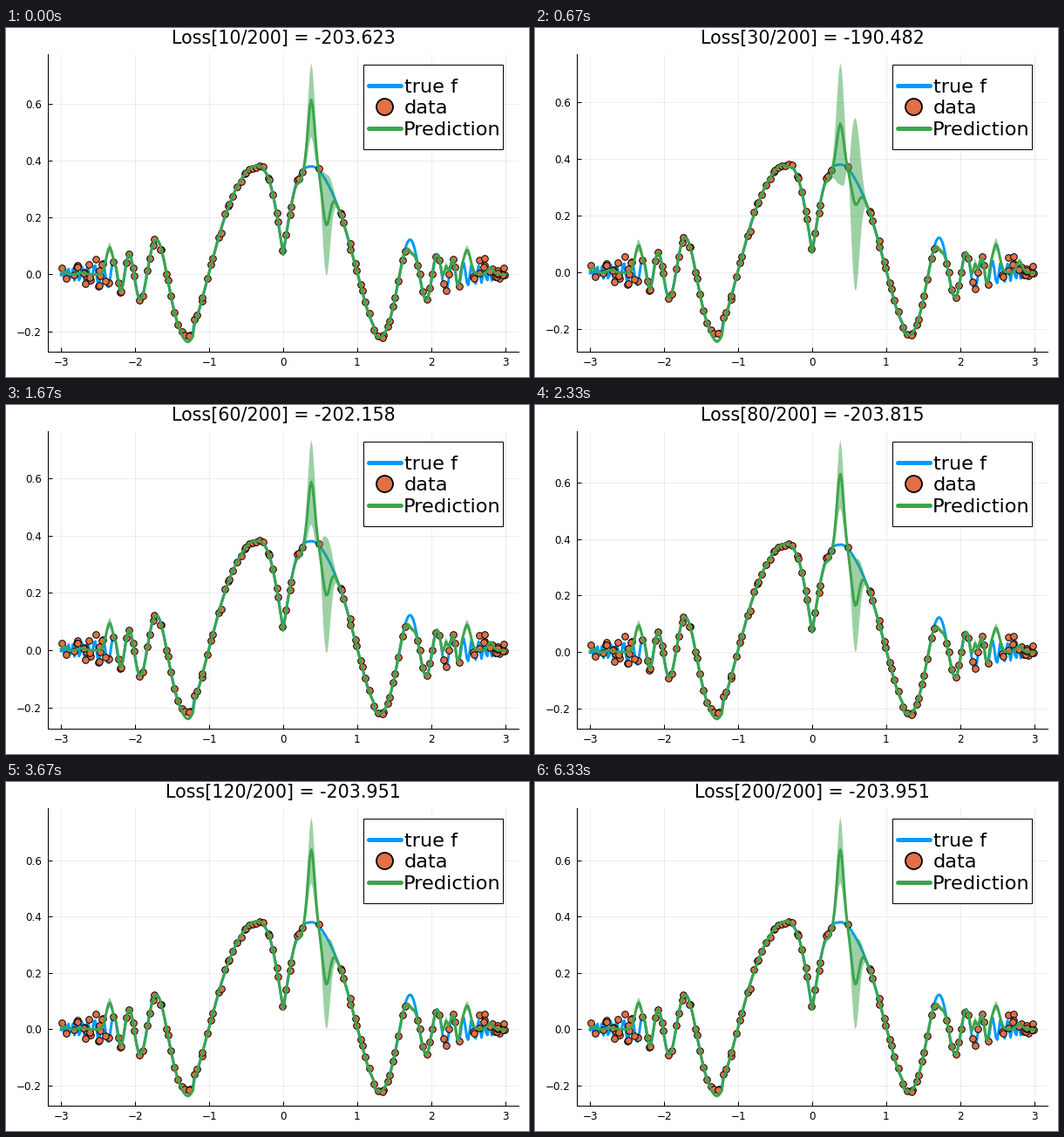
A matplotlib script for the animation above (6.66 s loop, 600 by 400 pixels).

```python
import numpy as np
import matplotlib.pyplot as plt
from matplotlib.animation import FuncAnimation
from matplotlib.patches import Rectangle

W, H, DPI = 600, 400, 100
PT = 72 / DPI  # points per pixel
LOOP, STEPS, TICK = 6660, 20, 45
BLUE, ORANGE, GREEN = "#009AFA", "#E26F46", "#3DA44D"
plt.rcParams["font.family"] = "DejaVu Sans"


def smooth(x, px, py):
    """Cubic Hermite curve through a few points."""
    px, py = np.array(px), np.array(py)
    m = np.gradient(py, px)
    k = np.clip(np.searchsorted(px, x) - 1, 0, len(px) - 2)
    h = px[k + 1] - px[k]
    t = (x - px[k]) / h
    return ((1 + 2 * t) * (1 - t) ** 2 * py[k] + t * (1 - t) ** 2 * h * m[k]
            + t * t * (3 - 2 * t) * py[k + 1] + t * t * (t - 1) * h * m[k + 1])


def bump(x, centre, width):
    return np.exp(-((x - centre) / width) ** 2)


def true_f(x):
    """Even function: a cusped hill in the middle, a decaying chirp outside."""
    a = np.abs(x)
    hill = smooth(np.minimum(a, 1.3),
                  [0, .05, .165, .38, .6, .8, 1, 1.15, 1.3],
                  [.07, .155, .31, .38, .32, .193, .008, -.135, -.222])
    phase = np.pi * (np.exp(2 * a) - 15) / 16.5
    return np.where(a < 1.22, hill, -1.62 * np.exp(-1.5 * a) * np.cos(phase))


# where the fit strays from the truth: centre, width, settled and rough height
BUMPS = [(-2.96, .04, .01, .04), (-2.72, .06, .006, .018),
         (-2.345, .065, .095, .1), (-1.27, .09, -.017, -.038),
         (-.33, .05, .006, -.035), (.235, .05, -.03, -.02),
         (1.73, .06, -.045, -.04), (2.2, .035, .09, .09),
         (2.485, .065, .085, .135), (2.8, .05, .022, .085)]


def predict(x, settle, rough):
    """Mean and half band; settle and rough run from 0 to 1."""
    # beyond the edge the fit no longer follows the chirp
    edge = np.where(x < 0, 2.25, 2.4)
    y = true_f(x) / (1 + np.exp((np.abs(x) - edge) / .015))
    half = np.full_like(x, .002)
    wild = max(rough, .2 * (1 - settle))
    for centre, width, calm, loose in BUMPS:
        part = (calm + wild * (loose - calm)) * bump(x, centre, width)
        y += part
        half += .17 * (1 + .6 * rough) * np.abs(part)

    # the gap without samples: one overshoot, one dip, pinned between
    y += (.155 + .102 * settle - .038 * rough) * bump(x, .38, .062)
    y -= (.105 + .064 * settle - .055 * rough) * bump(x, .58, .07)
    gap = (.175 - .06 * settle + .125 * rough) * bump(x, .382, .075)
    gap += (.245 - .087 * settle + .195 * rough) * bump(x, .585, .08)
    return y, half + gap * (1 - bump(x, .483, .03))


rng = np.random.default_rng(4)
core = np.linspace(-2.34, 2.37, 108) + rng.normal(0, .015, 108)
for start, end in ((.28, .73), (1.67, 1.79)):
    core = core[(core < start) | (core > end)]
core = np.append(core, .483)
tails = np.r_[rng.uniform(-3, -2.38, 21), rng.uniform(2.54, 3, 21)]
data_x = np.r_[core, tails]
data_y = np.r_[true_f(core) + rng.normal(0, .005, core.size),
               true_f(tails) + rng.normal(0, .016, tails.size)]

LOSS = ["-203.623", "-173.17", "-190.482", "-195.116", "-201.274", "-202.158",
        "-203.417", "-203.815", "-203.917", "-203.944", "-203.949", "-203.951"]

fig = plt.figure(figsize=(W / DPI, H / DPI), dpi=DPI, facecolor="white")
ax = fig.add_axes([0, 0, 1, 1])
ax.set_xlim(-3.18, 3.18)
ax.set_axisbelow(True)
ax.grid(color="black", alpha=.1, lw=.7 * PT)
ax.spines[["top", "right"]].set_visible(False)
ax.spines[["left", "bottom"]].set_linewidth(PT)
ax.tick_params(direction="in", length=5 * PT, width=PT, labelsize=12 * PT)
ax.tick_params(axis="x", pad=6.3 * PT)
ax.tick_params(axis="y", pad=7.3 * PT)


def label(v, digits):
    return f"{v:.{digits}f}".replace("-", "\u2212")


ax.set_xticks(range(-3, 4), [label(v, 0) for v in range(-3, 4)])

grid = np.linspace(-3, 3, 301)
ax.plot(grid, true_f(grid), color=BLUE, lw=3 * PT, zorder=3)
ax.plot(data_x, data_y, "o", ms=7.6 * PT, mfc=ORANGE, mec="black",
        mew=PT, zorder=4)
ribbon, = ax.fill([0, 0, 0], [0, 0, 0], color=GREEN, alpha=.5, lw=0, zorder=5)
fit_line, = ax.plot([], [], color=GREEN, lw=3 * PT, zorder=6)

# pixel-space layer for the title and the legend
top = fig.add_axes([0, 0, 1, 1], zorder=5)
top.set_xlim(0, W)
top.set_ylim(H, 0)
top.axis("off")
title = top.text(318, 18.2, "", size=20.7 * PT, ha="center", va="baseline")
top.add_patch(Rectangle((410, 42), 160, 97, fc="white", ec="black", lw=PT))
for row, (x, name, color) in enumerate(((456.9, "true f", BLUE),
                                        (456.6, "data", None),
                                        (455.5, "Prediction", GREEN))):
    y = 66.3 + 24.1 * row
    if color:
        top.plot([415.5, 452.5], [y, y], color=color, lw=5 * PT,
                 solid_capstyle="round")
    else:
        top.plot(433.7, y, "o", ms=19 * PT, mfc=ORANGE, mec="black",
                 mew=1.8 * PT)
    top.text(x, y + 8.1, name, size=22.5 * PT, va="baseline")


def update(i):
    step = (i * TICK + TICK - 1) * STEPS // LOOP
    settle = np.interp(step, [0, 1, 3, 5, 7, 9], [.78, 0, 0, .5, .93, 1])
    rough = np.interp(step, [0, 1, 2, 3], [0, 1, .3, 0])
    y, half = predict(grid, settle, rough)
    fit_line.set_data(grid, y)
    ribbon.set_xy(np.c_[np.r_[grid, grid[::-1]],
                        np.r_[y + half, (y - half)[::-1]]])

    lo, hi = (y - half).min(), (y + half).max()
    pad = .03 * (hi - lo)
    ax.set_ylim(lo - pad, hi + pad)
    coarse = hi - lo > 1.03
    size, digits, left = (.25, 2, 55.5) if coarse else (.2, 1, 48)
    ticks = [n * size for n in range(-1, 4)]
    ax.set_yticks(ticks, [label(v, digits) for v in ticks])
    ax.set_position([left / W, 1 - 371 / H, (588 - left) / W, 340.8 / H])

    title.set_x((left + 588) / 2)
    loss = LOSS[min(step, len(LOSS) - 1)]
    title.set_text(f"Loss[{10 * (step + 1)}/200] = {loss}")
    return fit_line, ribbon, title


anim = FuncAnimation(fig, update, frames=LOOP // TICK, interval=TICK,
                     repeat=True, repeat_delay=0, blit=False)
plt.show()
```
